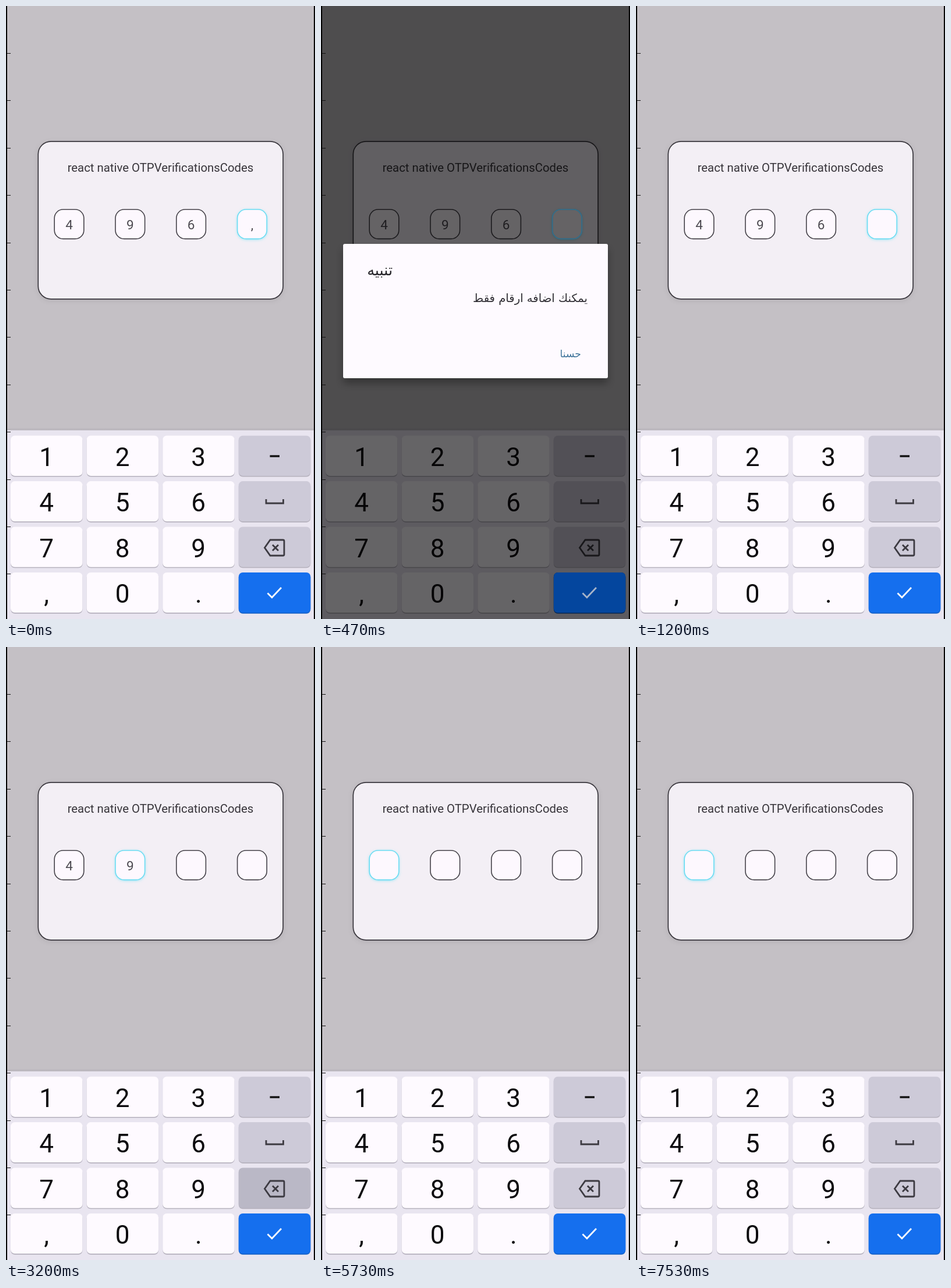
An HTML page for the animation above (8000 ms loop, 531 px wide and 1054 px high).

```html
<!DOCTYPE html>
<html lang="en">
<head>
<meta charset="utf-8">
<title>OTP input</title>
<style>
  html, body { margin: 0; width: 100%; height: 100%; overflow: hidden; background: #c4c0c5; }
  svg { display: block; font-family: Roboto, sans-serif; }
  .mid { text-anchor: middle; }
  .arabic { font-family: "DejaVu Sans", sans-serif; direction: rtl; text-anchor: start; }
  .line { fill: none; stroke-width: 2.8; }
</style>
</head>
<body>
<svg id="stage" width="531" height="1054" viewBox="0 0 531 1054"></svg>
<script>
const LOOP = 8000;
const stage = document.getElementById('stage');
const find = id => document.getElementById(id);
const rect = (x, y, w, h, r, fill, extra = '') =>
  `<rect x="${x}" y="${y}" width="${w}" height="${h}" rx="${r}" fill="${fill}" ${extra}/>`;
const text = (x, y, size, fill, label, extra = 'class="mid"') =>
  `<text x="${x}" y="${y}" font-size="${size}" fill="${fill}" ${extra}>${label}</text>`;
const path = (d, stroke, extra = '') => `<path class="line" d="${d}" stroke="${stroke}" ${extra}/>`;

const CHECK = 'M449.5 1009.5L457 1017L473 1000';
const ICONS = [
  path('M453.5 774H470', '#111', 'style="stroke-width:3.4"'),
  path('M447 848V855H476.5V848', '#3c3a41'),
  path('M454 918H476Q478 918 478 920V943Q478 945 476 945H454L444.5 931.5Z' +
    'M458 926.5L468 936.5M468 926.5L458 936.5', '#3c3a41'),
  path(CHECK, '#fff')
];

function keyPad() {
  return [...'123-456_789<,0.+'].map((key, i) => {
    const col = i % 4, row = i >> 2;
    const x = 8 + col * 130.6, y = 738.7 + row * 78.4;
    const fill = key === '+' ? '#156fee' : col === 3 ? '#cdcad8' : '#fefaff';
    return rect(x, y + 1.6, 123.5, 69.2, 7, key === '+' ? '#1560c8' : '#b5b1bd') +
      rect(x, y, 123.5, 69.2, 7, fill, `id="key${i}"`) +
      (col === 3 ? ICONS[row] : text(x + 61.5, y + 52, 44, '#0c0b0e', key));
  }).join('');
}

const boxX = i => 83.2 + i * 104.8;
const boxes = [0, 1, 2, 3].map(i =>
  rect(boxX(i), 349.8, 50.6, 50.6, 15, '#fdf8fe', `id="box${i}" stroke-width="1.6"`) +
  text(boxX(i) + 25.3, 384, 22.5, '#4d4a51', '', `id="digit${i}" class="mid"`)).join('');
const ticks = Array.from({ length: 12 }, (_, i) =>
  rect(2, 81 + Math.round(i * 81.4), 6, 1, 0, '#111')).join('');

stage.innerHTML = `
  <defs>
    <filter id="glow" x="-30%" y="-30%" width="160%" height="160%">
      <feDropShadow dx="0" dy="1" stdDeviation="2" flood-color="#5fe0f5" flood-opacity=".55"/>
    </filter>
    <filter id="soft"><feDropShadow dx="0" dy="2" stdDeviation="4" flood-opacity=".09"/></filter>
    <filter id="deep" x="-10%" y="-15%" width="120%" height="135%">
      <feDropShadow dx="0" dy="9" stdDeviation="7" flood-opacity=".32"/>
    </filter>
    <linearGradient id="edge" x2="0" y2="1">
      <stop stop-color="#c4c0c5"/><stop offset="1" stop-color="#b3afb6"/>
    </linearGradient>
  </defs>
  ${rect(0, 0, 531, 1054, 0, '#c4c0c5')}
  ${rect(55.3, 232.8, 420.8, 271, 22, '#f3eff5', 'stroke="#39363c" stroke-width="1.7" filter="url(#soft)"')}
  ${text(265.5, 285, 20.35, '#37343a', 'react native OTPVerificationsCodes')}
  ${boxes}
  ${rect(0, 725, 531, 5, 0, 'url(#edge)')}
  ${rect(0, 729.5, 531, 325, 0, '#e9e5f0')}
  ${keyPad()}
  ${rect(0, 0, 531, 1054, 0, '#000', 'id="dim"')}
  <g id="tint">
    ${rect(400, 974, 123.3, 69.2, 7, '#04469e')}${path(CHECK, '#a7b4c9')}
    ${rect(boxX(3), 349.8, 50.6, 50.6, 15, 'none', 'stroke="#35708f" stroke-width="1.6"')}
  </g>
  ${ticks}
  ${rect(0, 0, 2, 1054, 0, '#000')}${rect(529, 0, 2, 1054, 0, '#000')}
  <g id="dialog">
    ${rect(38, 409, 455, 231, 3, '#fefaff', 'filter="url(#deep)"')}
    ${text(123, 463, 25.5, '#252328', 'تنبيه', 'class="arabic"')}
    ${text(458, 509, 19.6, '#302e34', 'يمكنك اضافه ارقام فقط', 'class="arabic"')}
    ${text(447, 604, 17.2, '#3f749b', 'حسنا', 'class="arabic"')}
  </g>`;

// [start, entered characters, focused box]
const STATES = [
  [0, '496,', 3], [70, '496', 3], [2600, '49', 1], [3270, '4', 0], [3670, '', 0],
  [4400, '6', 1], [4670, '64', 2], [4970, '649', 3], [5270, '6497', 3], [5500, '', 0],
  [6140, '4', 1], [6400, '46', 2], [6670, '467', 3], [6930, '4679', 3], [7200, '', 0]
];
// [start, end, key]
const PRESSES = [
  [2200, 2390, 11], [2600, 2860, 11], [3200, 3390, 11], [3600, 3860, 11],
  [4330, 4460, 6], [4540, 4660, 4], [4900, 5030, 10], [5200, 5330, 8],
  [6070, 6200, 4], [6330, 6460, 6], [6600, 6730, 8], [6870, 7000, 10]
];

const ramp = (t, from, to) => Math.min(1, Math.max(0, (t - from) / (to - from)));
const easeOut = u => 1 - (1 - u) ** 2;

function draw(t) {
  const [, entry, focus] = STATES.findLast(s => s[0] <= t);
  for (let i = 0; i < 4; i++) {
    const box = find('box' + i), active = i === focus;
    box.setAttribute('stroke', active ? '#6bdcf2' : '#454249');
    box.setAttribute('filter', active ? 'url(#glow)' : 'none');
    find('digit' + i).textContent = entry[i] || '';
  }

  for (const key of new Set(PRESSES.map(p => p[2]))) {
    const down = PRESSES.some(([from, to, k]) => k === key && t >= from && t < to);
    const [idle, held] = key === 11 ? ['#cdcad8', '#bab8c6'] : ['#fefaff', '#dfdce8'];
    find('key' + key).setAttribute('fill', down ? held : idle);
  }

  const enter = t < 70 ? 0 : easeOut(ramp(t, 30, 330));
  const shade = enter * (1 - ramp(t, 830, 1150));
  const panel = enter * (1 - ramp(t, 830, 1050));
  const scale = 0.9 + 0.1 * enter;
  find('dim').setAttribute('opacity', 0.6 * shade);
  find('tint').setAttribute('opacity', shade);
  find('dialog').setAttribute('opacity', panel);
  find('dialog').setAttribute('transform',
    `translate(265.5 524.5) scale(${scale}) translate(-265.5 -524.5)`);
}

function tick() {
  draw(performance.now() % LOOP);
  requestAnimationFrame(tick);
}
tick();
</script>
</body>
</html>
```
